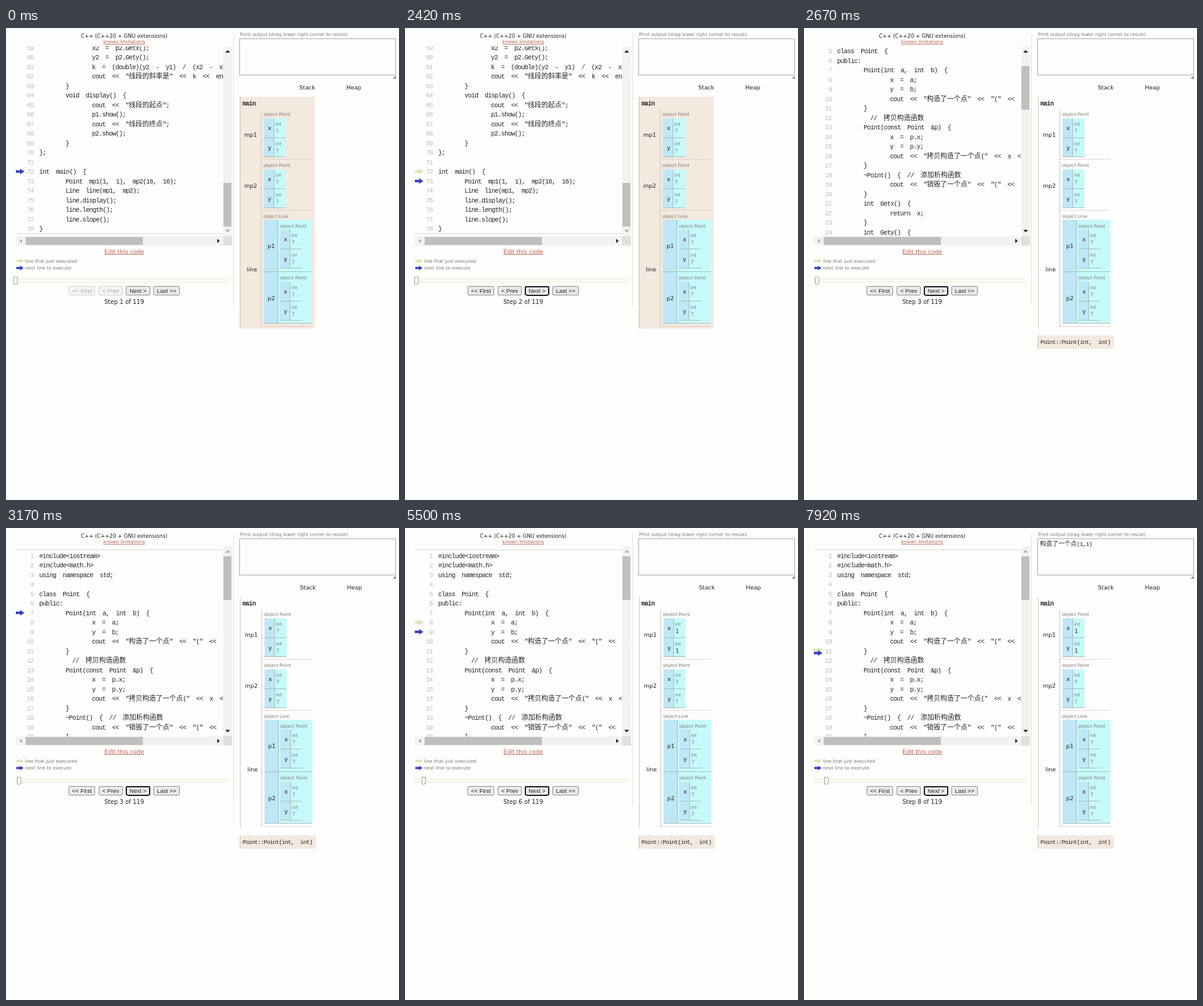
Recreate the animation shown at these times as an HTML page. Size 640 by 768 pixels, loop 8000 ms.

```html
<!DOCTYPE html>
<html lang="en">
<head>
<meta charset="utf-8">
<title>Code stepper</title>
<style>
  html, body { margin: 0; width: 100%; height: 100%; overflow: hidden; background: #fdfdfc; }
  svg { display: block; width: 640px; height: 768px; font-family: "DejaVu Sans", Verdana, sans-serif; }
  rect, line { shape-rendering: crispEdges; }
  .btn { font-family: "Liberation Sans", Arial, sans-serif; }
  .code { font: 10.5px "Liberation Mono", monospace; letter-spacing: -.8px; word-spacing: 5.25px; }
  .cjk { font: 11px "Noto Sans CJK SC", "Noto Sans CJK", sans-serif; letter-spacing: 0; }
</style>
</head>
<body>
<svg id="stage" viewBox="0 0 640 768" xmlns="http://www.w3.org/2000/svg"></svg>
<script>
const PAPER = '#fdfdfc', INK = '#24231f', SOFT = '#7c7a74', FAINT = '#a9a8a2',
      RULE = '#d8d7d2', TRACK = '#f3f2f1', THUMB = '#c0bfbe', GLOW = '#f4e9df',
      NAME = '#bfe7f6', VALUE = '#c6fafa', GRID = '#a9bcb8', EDGE = '#d2c3bc',
      LINK = '#b5604c', BLUE = '#3340c4', PALE = '#d8e4b0';
const PITCH = 15.5, BOTTOM = 912;

// time, line just executed, next line
const steps = [
  [0, 0, 72], [1250, 72, 73], [2420, 73, 7], [3690, 7, 8],
  [4420, 8, 8], [5080, 8, 9], [6190, 9, 10], [7400, 11, 11]
];

const source = `#include<iostream>
#include<math.h>
using namespace std;

class Point {
public:
    Point(int a, int b) {
        x = a;
        y = b;
        cout << "构造了一个点" << "(" << x << "," << y << ")" << endl;
    }
     // 拷贝构造函数
    Point(const Point &p) {
        x = p.x;
        y = p.y;
        cout << "拷贝构造了一个点(" << x << "," << y << ")" << endl;
    }
    ~Point() { // 添加析构函数
        cout << "销毁了一个点" << "(" << x << "," << y << ")" << endl;
    }
    int Getx() {
        return x;
    }
    int Gety() {
        return y;
    }
    void show() {
        cout << "(" << x << "," << y << ")" << endl;
    }
private:
    int x, y;
};

class Line {
private:
    Point p1, p2;
public:
    Line(Point a, Point b) : p1(a), p2(b) {
    }
    void length() {
        int x1, x2, y1, y2;
        double len;
        x1 = p1.Getx();
        y1 = p1.Gety();
        x2 = p2.Getx();
        y2 = p2.Gety();
        len = sqrt((x2 - x1) * (x2 - x1)
            + (y2 - y1) * (y2 - y1));
        cout << "线段的长度是" << len << endl;
    }
    // 计算斜率
    void slope() {
        int x1, x2, y1, y2;
        double k;

        x1 = p1.Getx();
        y1 = p1.Gety();

        x2 = p2.Getx();
        y2 = p2.Gety();
        k = (double)(y2 - y1) / (x2 - x1);
        cout << "线段的斜率是" << k << endl;
    }
    void display() {
        cout << "线段的起点";
        p1.show();
        cout << "线段的终点";
        p2.show();
    }
};

int main() {
    Point mp1(1, 1), mp2(16, 16);
    Line line(mp1, mp2);
    line.display();
    line.length();
    line.slope();
}`.split('\n');

const esc = s => s.replace(/&/g, '&amp;').replace(/</g, '&lt;');
const text = (x, cy, s, size, fill = INK, more = '') =>
  `<text x="${x}" y="${cy + size * .36}" font-size="${size}" fill="${fill}" ${more}>${esc(s)}</text>`;
const rect = (x, y, w, h, fill, more = '') =>
  `<rect x="${x}" y="${y}" width="${w}" height="${h}" fill="${fill}" ${more}/>`;
const rule = (x1, y1, x2, y2, color = RULE, more = '') =>
  `<line x1="${x1}" y1="${y1}" x2="${x2}" y2="${y2}" stroke="${color}" ${more}/>`;
const poly = (points, fill, more = '') => `<polygon points="${points}" fill="${fill}" ${more}/>`;
const arrow = (fill, more = '') => poly('16,-2 23,-2 23,-4.5 30,0 23,4.5 23,2 16,2', fill, more);
const middle = 'text-anchor="middle"';

const lineY = n => 45 + (n - 1) * PITCH;

function codeLine(src, i) {
  const n = i + 1, y = lineY(n) + 3.5;
  const indent = src.search(/\S|$/);
  const body = esc(src.trim()).replace(/[\u4e00-\u9fff]+/g, m => `<tspan class="cjk">${m}</tspan>`);
  return `<text class="code" x="45" y="${y}" text-anchor="end" fill="#bcbbb5">${n}</text>` +
    `<text class="code" x="${54 + indent * 10.75}" y="${y}" fill="${INK}">${body}</text>`;
}

function button(id, x, w, label) {
  return `<g id="${id}">` + rect(x + .5, 420.5, w - 1, 14, '#ecebea', 'stroke="#8b8a86" rx="2"') +
    text(x + w / 2, 427.6, label, 9.5, INK, `class="btn" ${middle}`) + '</g>';
}

// x/y cells of one Point; left and top are its corner
function point(left, top, id) {
  const row = (name, y) =>
    text(left + 6.5, y + 16, name, 9.4) +
    text(left + 18.5, y + 9, 'int', 7.6, SOFT) +
    text(left + 19.5, y + 21, '?', 8.8, SOFT, id ? `id="${id}${name}"` : '');
  return rect(left, top, 16, 63, NAME) + rect(left + 16, top, 20, 63, VALUE) +
    rule(left + 16.5, top, left + 16.5, top + 63, GRID) +
    rule(left, top + 31.5, left + 36, top + 31.5, GRID) +
    rule(left, top + 62.5, left + 36, top + 62.5, GRID) +
    row('x', top) + row('y', top + 32);
}

function mainFrame() {
  const name = (s, cy) => text(409, cy, s, 9.4, INK, 'text-anchor="end"');
  const type = (x, cy, s) => text(x, cy, 'object ' + s, 7.5, SOFT);
  const edge = y => rule(416, y, 498, y, EDGE, 'stroke-dasharray="2 1"');
  return rule(415.5, 133, 415.5, 486, EDGE) + edge(213.5) + edge(296.5) + edge(485.5) +
    name('mp1', 174) + name('mp2', 256.5) + name('line', 392.5) +
    type(419, 140.5, 'Point') + type(419, 223.5, 'Point') + type(419, 306.5, 'Line') +
    point(420, 147, 'mp1') + point(420, 230) +
    rect(420, 312, 22, 169, NAME) + rect(442, 312, 56, 169, VALUE) +
    rule(442.5, 312, 442.5, 481, GRID) +
    rule(420, 396.5, 498, 396.5, GRID) + rule(420, 480.5, 498, 480.5, GRID) +
    text(432, 355, 'p1', 9.4, INK, middle) + text(432, 440, 'p2', 9.4, INK, middle) +
    type(445.5, 322, 'Point') + type(445.5, 406, 'Point') +
    point(446, 328) + point(446, 413);
}

document.getElementById('stage').innerHTML =
  rect(0, 0, 640, 768, PAPER) +
  '<clipPath id="view"><rect x="14" y="30" width="340" height="309"/></clipPath>' +
  text(192.5, 13, 'C++ (C++20 + GNU extensions)', 8.5, INK, middle) +
  text(192.5, 22.3, 'known limitations', 7.7, LINK, middle + ' text-decoration="underline"') +
  rule(370.5, 9, 370.5, 452, '#e2e1dc') +

  '<g clip-path="url(#view)"><g id="code">' +
  rule(16, 35.5, 354, 35.5) + rule(16, 1246.5, 354, 1246.5) +
  source.map(codeLine).join('') + arrow(PALE, 'id="prev"') + arrow(BLUE, 'id="cur"') + '</g></g>' +

  rect(354, 30, 14, 309, TRACK) + '<rect id="thumb" x="354" width="13" height="71" fill="' + THUMB + '"/>' +
  poly('357,40 361,36 365,40', INK, 'id="up"') + poly('357,328.5 361,332.5 365,328.5', INK, 'id="down"') +
  rect(16, 339, 338, 15, TRACK) + rect(354, 339, 14, 15, '#e0dfde') + rect(32, 340, 191, 13, THUMB) +
  poly('26,343 22,346.5 26,350', FAINT) + poly('344,343 348,346.5 344,350', INK) +

  text(192.5, 363.5, 'Edit this code', 9.5, LINK, middle + ' text-decoration="underline"') +
  `<g transform="translate(0 379)">${arrow(PALE, 'transform="translate(3 0) scale(.86)"')}</g>` +
  `<g transform="translate(0 390.5)">${arrow(BLUE, 'transform="translate(3 0) scale(.86)"')}</g>` +
  text(31, 379.5, 'line that just executed', 7.6, SOFT) + text(31, 390.7, 'next line to execute', 7.6, SOFT) +

  rect(16.5, 408.5, 346, 5, '#fbfaf2', 'stroke="#efedd2"') +
  '<rect id="knob" x="12.5" y="405" width="6" height="12" rx="2" fill="#f8f8f6" stroke="#a5a4a0"/>' +
  button('first', 102, 43, '<< First') + button('back', 151, 39, '< Prev') +
  button('next', 195, 40, 'Next >') + button('last', 240, 43, 'Last >>') +
  rect(196, 420.5, 38, 14, 'none', 'id="focus" stroke="#1c1b1c" stroke-width="2" rx="2"') +
  text(192.5, 445.2, '', 9.6, INK, middle + ' id="count"') +

  text(381, 9.8, 'Print output (drag lower right corner to resize)', 7.6, SOFT) +
  rect(380.5, 17.5, 254, 59, PAPER, 'stroke="#a9a8a4"') +
  poly('635,77.5 635,82.5 629.5,82.5', '#8c8b88') +
  '<text id="out" x="384" y="28.5" class="cjk" style="font-size:10px" fill="' + INK + '">构造了一个点' +
  '<tspan class="code" style="font-size:9.5px;letter-spacing:-.7px">(1,1)</tspan></text>' +

  rect(380, 112, 123, 377, GLOW, 'id="glow"') + rule(381, 112, 381, 489, '#cfcbb8') +
  `<text class="code" x="385" y="126" style="font-weight:bold;font-size:10px;letter-spacing:-.7px" fill="${INK}">main</text>` +
  '<g id="stack">' + text(477.5, 96.5, 'Stack', 9.4) + text(554.3, 96.5, 'Heap', 9.4) + mainFrame() + '</g>' +
  '<g id="call">' + rect(380, 500, 125, 22, GLOW) + rule(381, 500, 381, 522, '#cfcbb8') +
  `<text class="code" x="385" y="513.5" style="font-size:9.6px;letter-spacing:-.82px" fill="${INK}">Point::Point(int, int)</text></g>`;

const $ = id => document.getElementById(id);
const set = (id, name, value) => $(id).setAttribute(name, value);
const show = (id, on) => set(id, 'visibility', on ? 'visible' : 'hidden');
const clamp = v => Math.max(0, Math.min(1, v));
const cubic = p => p < .5 ? 4 * p ** 3 : 1 - 4 * (1 - p) ** 3;
const swing = p => .5 - Math.cos(p * Math.PI) / 2;

// arrow heights; both shift when they share a line
const prevY = ([, prev, cur]) => lineY(prev) - (prev === cur ? 1.5 : 0);
const curY = ([, prev, cur]) => lineY(cur) + (prev === cur ? 3.5 : 0);

function fillValue(id, known) {
  $(id).textContent = known ? '1' : '?';
  set(id, 'fill', known ? INK : SOFT);
}

function draw(t) {
  const k = steps.findLastIndex(s => s[0] <= t), n = k + 1;
  const now = steps[k], old = steps[Math.max(0, k - 1)], age = t - now[0];

  const scroll = BOTTOM * (1 - swing(clamp((t - steps[2][0]) / 300)));
  set('code', 'transform', `translate(0 ${-scroll})`);
  set('thumb', 'y', 46 + scroll * .226);
  set('up', 'fill', scroll > 0 ? INK : FAINT);
  set('down', 'fill', scroll < BOTTOM ? INK : FAINT);

  // the pale arrow fades out, jumps and fades in; the blue one then slides
  const move = cubic(clamp((age - 200) / 250));
  const leaving = age < 200, from = leaving ? old : now;
  set('prev', 'transform', `translate(0 ${prevY(from)})`);
  set('prev', 'opacity', from[1] ? (leaving ? 1 - cubic(age / 200) : move) : 0);
  set('cur', 'transform', `translate(0 ${curY(old) + (curY(now) - curY(old)) * move})`);

  set('knob', 'x', 12.5 + k * 346 / 118);
  $('count').textContent = `Step ${n} of 119`;
  for (const id of ['first', 'back']) set(id, 'opacity', n > 1 ? 1 : .4);
  show('focus', n > 1);

  const inCall = n > 2;
  show('glow', !inCall);
  show('call', inCall);
  set('stack', 'transform', `translate(${inCall ? 1 : 0} 0)`);
  fillValue('mp1x', n > 4);
  fillValue('mp1y', n > 5);
  show('out', n > 6);
}

const FRAME = 1000 / 12, start = performance.now();
function tick() {
  const t = (performance.now() - start) % 8000;
  draw(Math.floor((t + 3.4) / FRAME) * FRAME);
  requestAnimationFrame(tick);
}
tick();
</script>
</body>
</html>
```
